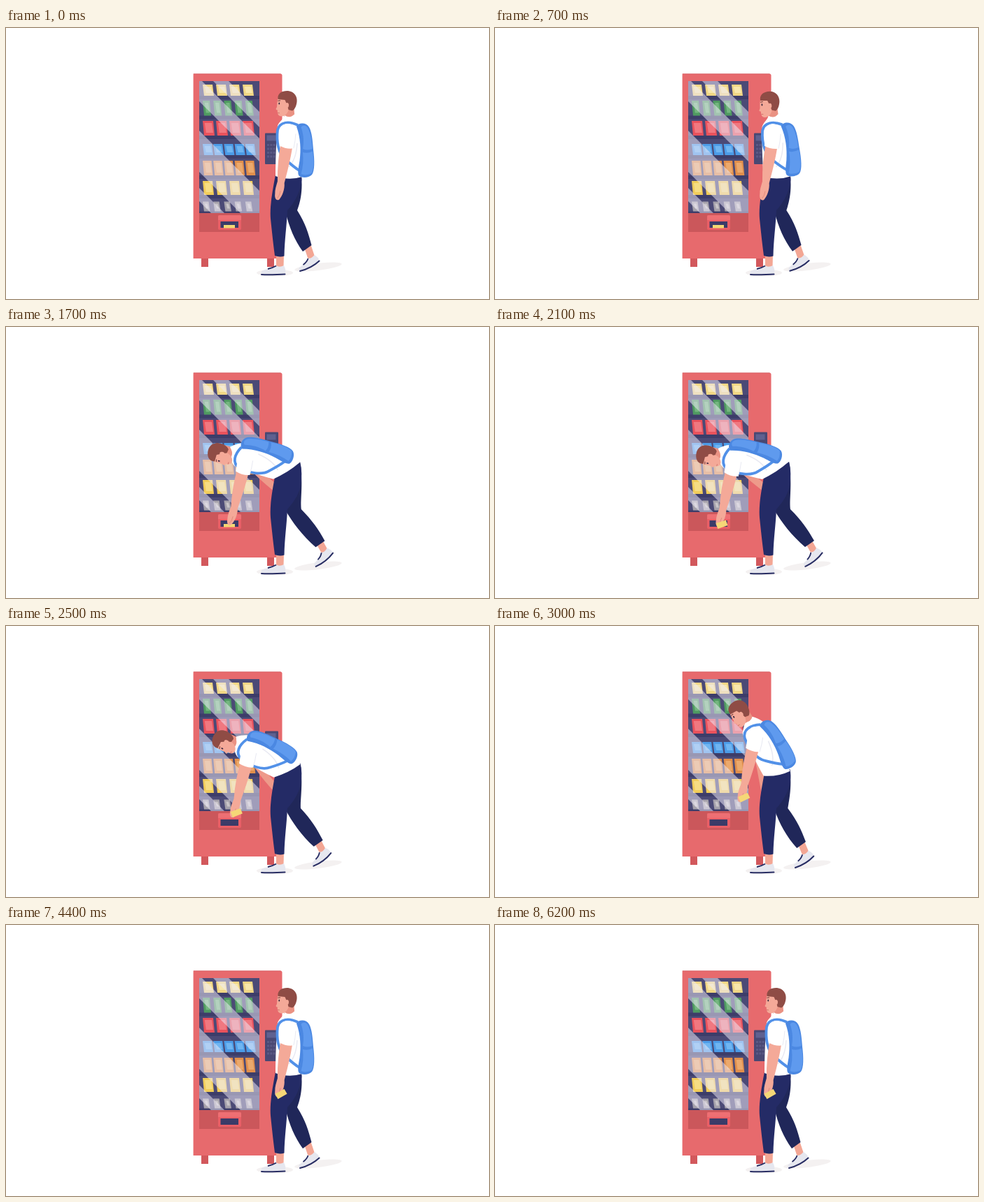
An HTML page that plays this animation: 690 by 388 pixels, repeating every 7 s.

```html
<!DOCTYPE html>
<html lang="en">
<head>
<meta charset="utf-8">
<title>Vending machine</title>
<style>
html, body { margin: 0; width: 100%; height: 100%; overflow: hidden; background: #fff; }
svg { display: block; width: 100vw; height: 100vh; }
</style>
</head>
<body>
<svg viewBox="0 0 690 388">
  <defs>
    <clipPath id="pane"><rect x="276" y="76" width="86" height="189"/></clipPath>
  </defs>

  <!-- machine -->
  <path d="M279 328h10v14h-10zM373 328h10v14h-10z" fill="#d2585c"/>
  <path d="M267.600 65.500H392Q394.500 65.500 394.500 68V330H267.600Z" fill="#e76a6d"/>
  <path d="M268 65.800H392.500" stroke="#c9575c" stroke-width=".6"/>
  <rect x="276" y="265" width="86" height="27" fill="#cb575b"/>
  <g clip-path="url(#pane)">
    <rect x="276" y="76" width="86" height="189" fill="#4b4a76"/>
    <g id="goods"></g>
    <g id="glare" fill="#eeeaf8" opacity=".52"></g>
  </g>
  <rect x="303" y="268" width="33" height="21" rx="2" fill="#ea5f66"/>
  <path d="M303 275V270Q303 268 305 268H334Q336 268 336 270V275Z" fill="#ee6f73"/>
  <rect x="306.500" y="277" width="25.500" height="9" fill="#3b3b68"/>
  <path id="snack" d="M311 282H327V286.500H311Z" fill="#f3d873"/>
  <g id="pad">
    <rect x="370" y="150.500" width="19" height="44.500" rx="1" fill="#494873"/>
    <rect x="372.500" y="153.500" width="13" height="8" fill="#5f6190"/>
    <g id="keys" fill="#5a5985"></g>
  </g>

  <!-- person -->
  <g fill="#f4f1f1">
    <ellipse cx="384" cy="350.500" rx="26" ry="5"/>
    <ellipse cx="446" cy="342" rx="34" ry="5" transform="rotate(-7 446 342)"/>
  </g>
  <path id="farArm" fill="none" stroke="#ee9a8a" stroke-width="10" stroke-linecap="round"/>
  <g id="backFoot">
    <path d="M426 314L435 309L441 327L432 332Z" fill="#f3a694"/>
    <path d="M419 343C424 339 430 335 431.500 329.500Q436 331 440.500 325C444 327 448 330 447 334C440 340 430 345 421 348Q416.500 347 419 343Z" fill="#e6e7ef"/>
    <path d="M424.500 339Q430 335 431.500 330" fill="none" stroke="#272c62" stroke-width="1.800"/>
    <path d="M420 348C430 345.500 440 340.500 447.500 333.500" fill="none" stroke="#272c62" stroke-width="2" stroke-linecap="round"/>
  </g>
  <path id="backLeg" fill="#202759"/>
  <path d="M386 324H397L396.500 342L386 344Z" fill="#f3a694"/>
  <path d="M366 347.500C373 345 381 343.500 386 340.500Q391 343 397 340C399.500 345 400 349 398.500 352.500H364.500Q364 349 366 347.500Z" fill="#e6e7ef"/>
  <path d="M374 345Q381 343.500 386 340.500" fill="none" stroke="#272c62" stroke-width="1.800"/>
  <path d="M365 352.900C375 353.900 385 352.900 398.500 352.600" fill="none" stroke="#272c62" stroke-width="2" stroke-linecap="round"/>
  <path id="frontLeg" fill="#242b66"/>
  <g id="torso">
    <path d="M397 111L411 109L412.500 129Q404 136 397 130Z" fill="#ea9283"/>
    <path id="shirt" fill="#fff"/>
    <path d="M416 165C415 182 411 192 404 199" fill="none" stroke="#e8e9f2" stroke-width="1.500"/>
    <path d="M417 139C404 133 391 134 388 146C386 162 389 180 399 188C405 193.500 411 199 419 204" fill="none" stroke="#5291e8" stroke-width="3.800"/>
    <path d="M415 141C418 135 429 135 433 142C437 149 438 161 439 174C441 190 441 205 437 210C432 215.500 421 214.500 418.500 211.500C416 208 418 199 419.500 190C421.500 174 421 158 415 141Z" fill="#4b88e2"/>
    <path d="M421.500 142C425 138 430 140 432 145C436 154 437 164 437.500 173Q430 176 424 173C426 162 425 152 421.500 142Z" fill="#5f9aee"/>
    <path d="M424 178Q431 180 438 176.500C440 188 440 202 436.500 208Q428 212 421.500 209C424.500 199 425 188 424 178Z" fill="#5f9aee"/>
    <g id="head">
      <path d="M397 111L409 109L410 122Q403 127 396 123Z" fill="#ea9283"/>
      <path d="M389 99C387 106 387.500 109 387 113L385.500 116Q386 117.500 387.800 117.500C387.500 123 389 126.500 393.500 126.500C399 126.500 403 121 404 116L407 99Z" fill="#f4a998"/>
      <path d="M388.500 102C387.500 93 395 89.500 403 90C412 91 416.500 98 415.500 106C414.500 113 412 117 409 118.500L403.500 117C402.500 112 400.500 108 398.500 103Z" fill="#8f4c45"/>
      <ellipse cx="401.500" cy="110.500" rx="2.500" ry="3.500" fill="#f4a998"/>
      <ellipse cx="390.300" cy="108" rx=".9" ry="1.600" fill="#34243c"/>
      <path d="M388.300 104.300L392 103.900" stroke="#6d3838" stroke-width="1"/>
      <path d="M388 121.500L391 121.800" stroke="#c96a63" stroke-width=".8"/>
    </g>
  </g>
  <g id="arm">
    <path d="M-8 15H9C9 38 6.500 58 5 72C7 80 5 91 1 96.500C-3 99.500-6 95-6 89C-7 84-6 78-5 71C-8 52-9 34-8 15Z" fill="#f4a998"/>
    <path d="M1 84Q1 91-2 95" fill="none" stroke="#dd8878" stroke-width=".8"/>
    <path d="M-9-9C-5-15 7-14 10-6C12 4 11.500 13 11 21Q1 24-9.500 20C-10 9-11 0-9-9Z" fill="#fff"/>
    <path d="M11 0Q12 11 11 21" fill="none" stroke="#e8e9f2" stroke-width="1"/>
  </g>
  <path id="held" d="M-8-1.500L6-6.500L9 1L-5 6.500Z" fill="#f5d777"/>
</svg>
<script>
const LOOP = 7000, STEP = 100, GRAB = 1900;
const $ = id => document.getElementById(id);
const set = (id, name, value) => $(id).setAttribute(name, value);

function add(parent, tag, attrs) {
  const el = document.createElementNS("http://www.w3.org/2000/svg", tag);
  for (const k in attrs) el.setAttribute(k, attrs[k]);
  $(parent).append(el);
}

// rows of goods: count, top, bottom, width, colour, label colour
const rows = [
  [4, 81, 97, 14, "#f0d684", "#f8e7ac"],
  [5, 104, 125.500, 10, "#4f9a61", "#74b67f"],
  [4, 133, 154, 15, "#e9525c", "#f07880"],
  [5, 166, 182, 13, "#4c9ce8", "#70b5f1"],
  [5, 190, 211, 12.500, "#e18f4c", "#eba96d"],
  [4, 219, 239, 14, "#f1cc59", "#f6dc83"],
  [5, 248.500, 262.500, 8.500, "#a5a1ab", "#c9c5c9"]
];
for (const [n, top, bottom, w, fill, label] of rows) {
  add("goods", "rect", { x: 276, y: bottom, width: 86, height: 5, fill: "#3d3d69" });
  for (let i = 0; i < n; i++) {
    const x = 283 + i * (n === 4 ? 19 : 15.200), h = bottom - top;
    const card = (a, b, c, d) => `M${x + a - 2} ${top + c}h${b - a}l2 ${d - c}h${a - b}Z`;
    add("goods", "path", { d: card(0, w, 0, h), fill });
    add("goods", "path", { d: card(2.800, w - 2, 3, h - 4), fill: label });
  }
}

// glare bands between the diagonals y = x + a and y = x + b
for (const [a, b] of [[-242, -220], [-204, -171], [-129, -70], [-47, -28]])
  add("glare", "path", { d: `M270 ${270 + a}L370 ${370 + a}V${370 + b}L270 ${270 + b}Z` });

for (let i = 0; i < 12; i++)
  add("keys", "rect", { x: 373 + i % 3 * 4.300, y: 166 + Math.floor(i / 3) * 5.500, width: 3, height: 3 });

const ease = (t, a, b) => (1 - Math.cos(Math.PI * Math.min(1, Math.max(0, (t - a) / (b - a))))) / 2;

function draw(t) {
  const p = Math.max(0, ease(t, 500, 1850) - ease(t, 2050, 3700));
  const lean = -72 * p, rad = lean * Math.PI / 180;
  const dx = -9 * Math.sqrt(p), dy = 4 * p;
  const place = (x, y) => {
    const u = x - 402, v = y - 205, c = Math.cos(rad), s = Math.sin(rad);
    return [402 + dx + u * c - v * s, 205 + dy + u * s + v * c];
  };

  set("torso", "transform", `translate(${dx} ${dy}) rotate(${lean} 402 205)`);
  set("head", "transform", `translate(0 ${5 * p}) rotate(${-24 * p + 14 * p * p} 405 126)`);
  set("shirt", "d", `M388 140C390 134 397 130 398 125Q406 130 412 123.500C420 131 425 140 426 150
    C427 175 424 195 ${423 + 2 * p} ${213 + 12 * p}Q${404 + 2 * p} ${219 - 5 * p} ${385 + 5 * p} ${212 - 15 * p}
    C${385 + 3 * p} ${188 - 4 * p} ${386 + 2 * p} 160 388 140Z`);

  const waist = `${422 - 2 * p} ${213 - 20 * p}`;
  set("backLeg", "d", `M${waist}C${424 + p} ${235 - 12 * p} 420 250 ${416 + 6 * p} 261
    C${428 + 10 * p} ${280 - 3 * p} ${432 + 15 * p} ${294 - 4 * p} ${436.500 + 19.500 * p} ${311 - 5 * p}
    L${424 + 19 * p} ${320 - 5 * p}C${412 + 12 * p} ${303 - 4 * p} ${405 + 4 * p} ${287 - 8 * p} 399 262V230Z`);
  set("frontLeg", "d", `M${385 - p} ${210 + 5 * p}C381 232 376.500 254 378 273C380 293 382 311 384 326
    Q391 328.500 397.500 326.500C398 303 401 284 402 261C410 252 419 240 ${422 - p} ${220 + 6 * p}
    Q${423 + p} ${216 - 10 * p} ${waist}Z`);
  set("backFoot", "transform", `translate(${23 * p} ${-5 * p}) rotate(${-11 * p} 419 346)`);

  const [fx, fy] = place(401, 155);
  set("farArm", "d", `M${fx} ${fy}Q${fx + 13 * p} ${(fy + 238) / 2 - 6 * p} ${390 - 22 * p * (1 - p)} 234`);

  const [sx, sy] = place(403, 150);
  const hx = 390 - 115 * p + 46 * p * p, hy = 240 + 41 * Math.pow(p, 2.5);
  const swing = Math.atan2(sx - hx, hy - sy) * 180 / Math.PI;
  set("arm", "transform", `translate(${sx} ${sy}) rotate(${swing})`);
  const taken = t >= GRAB;
  set("held", "transform", `translate(${hx + 2.500} ${hy + 2}) rotate(${-8 + 10 * p})`);
  set("held", "visibility", taken ? "visible" : "hidden");
  set("snack", "visibility", taken ? "hidden" : "visible");
}

const start = performance.now();
function tick() {
  const t = (performance.now() - start) % LOOP;
  draw(Math.floor(t / STEP) * STEP);
  requestAnimationFrame(tick);
}
tick();
</script>
</body>
</html>
```
